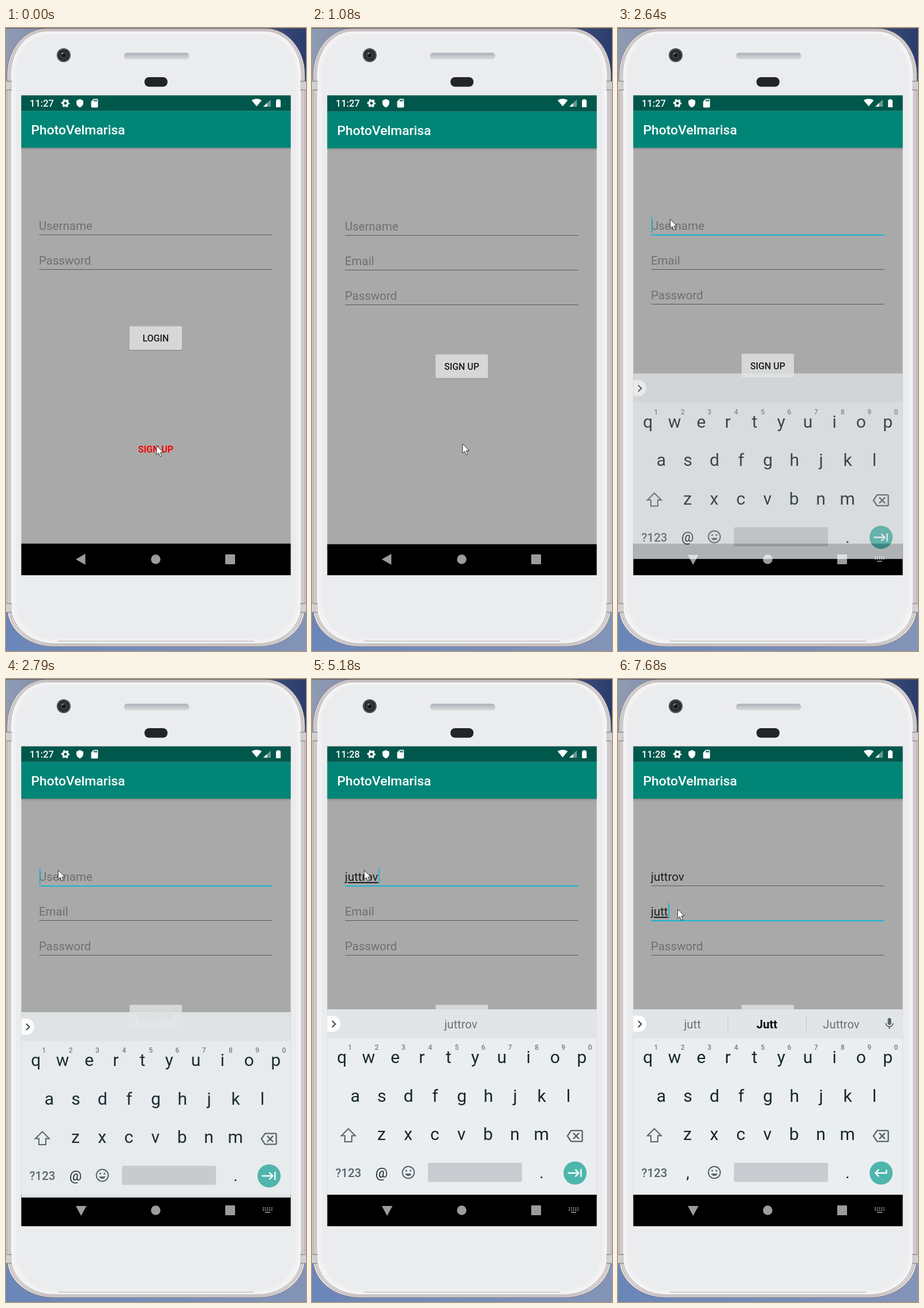
An HTML page that plays this animation: 520x1077 px, repeating every 8000 ms.

```html
<!DOCTYPE html>
<html lang="en">
<head>
<meta charset="utf-8">
<title>Sign up</title>
<style>
  html, body { margin: 0; width: 100%; height: 100%; overflow: hidden; background: #8b94a8; }
  svg { display: block; width: 100vw; height: 100vh; font-family: Roboto, "Noto Sans", sans-serif; }
  .typing { text-decoration: underline; text-decoration-skip-ink: none; }
</style>
</head>
<body>
<svg id="stage" viewBox="0 0 520 1077">
  <defs>
    <linearGradient id="sky"><stop stop-color="#8f9ab3"/><stop offset=".8" stop-color="#4a5a82"/><stop offset="1" stop-color="#2a3c6c"/></linearGradient>
    <linearGradient id="sea"><stop stop-color="#6a86b8"/><stop offset="1" stop-color="#8394b7"/></linearGradient>
    <linearGradient id="slot" x2="0" y2="1"><stop stop-color="#a9adb4"/><stop offset="1" stop-color="#d8dade"/></linearGradient>
    <linearGradient id="shade" x2="0" y2="1"><stop stop-opacity=".17"/><stop offset="1" stop-opacity="0"/></linearGradient>
    <clipPath id="screen"><rect x="26.5" y="116.5" width="467" height="829.5"/></clipPath>
  </defs>
  <g id="phone"></g>
  <g clip-path="url(#screen)" id="view"></g>
  <g id="mouse"><path d="M0 0V16L3.7 12.6 6 19 8.8 17.8 6.4 11.7H11.5Z" fill="#fff" stroke="#222" stroke-width=".9"/></g>
</svg>
<script>
const $ = id => document.getElementById(id);
const NAME = 'juttrov', SIZE = 20.45, LEFT = 57, CYAN = '#16b4d4';
const pen = document.createElement('canvas').getContext('2d');

const rect = (x, y, w, h, fill, extra = '') =>
  `<rect x="${x}" y="${y}" width="${w}" height="${h}" fill="${fill}" ${extra}/>`;
const dot = (x, y, r, fill, extra = '') =>
  `<circle cx="${x}" cy="${y}" r="${r}" fill="${fill}" ${extra}/>`;
const path = (d, fill, extra = '') => `<path d="${d}" fill="${fill}" ${extra}/>`;
const line = (d, stroke, width, extra = '') =>
  path(d, 'none', `stroke="${stroke}" stroke-width="${width}" ${extra}`);
const text = (s, x, y, size, fill, extra = '') =>
  `<text x="${x}" y="${y}" font-size="${size}" fill="${fill}" ${extra}>${s}</text>`;
const mid = (s, x, y, size, fill, weight = 400) =>
  text(s, x, y, size, fill, `text-anchor="middle" font-weight="${weight}"`);
// Icons live on a 24 unit grid, placed by their centre
const icon = (d, x, y, scale, fill) =>
  path(d, fill, `transform="translate(${x} ${y}) scale(${scale}) translate(-12 -12)"`);

const ICONS = {
  shield: 'M12 1L3 5v6c0 5.6 3.8 10.7 9 12 5.2-1.3 9-6.4 9-12V5z',
  card: 'M18 2h-8L4 8v12c0 1.1.9 2 2 2h12c1.1 0 2-.9 2-2V4c0-1.1-.9-2-2-2zm-6 6h-2V4h2zm3 0h-2V4h2zm3 0h-2V4h2z',
  wifi: 'M12 21L24 6.5C23 5.8 18.5 3 12 3S1 5.8 0 6.5z',
  mic: 'M12 14c1.7 0 3-1.3 3-3V5c0-1.7-1.3-3-3-3S9 3.3 9 5v6c0 1.7 1.3 3 3 3zm5.3-3c0 3-2.5 5.1-5.3 5.1S6.7 14 6.7 11H5c0 3.4 2.7 6.2 6 6.7V21h2v-3.3c3.3-.5 6-3.3 6-6.7z',
  enter: 'M19 7v4H5.8l3.6-3.6L8 6l-6 6 6 6 1.4-1.4L5.8 13H21V7z',
  tab: 'M11.6 7.4L15.2 11H1v2h14.2l-3.6 3.6L13 18l6-6-6-6zM20 6v12h2V6z',
  erase: 'M22 3H7c-.7 0-1.2.4-1.6.9L0 12l5.4 8.1c.4.5.9.9 1.6.9h15c1.1 0 2-.9 2-2V5c0-1.1-.9-2-2-2zm0 16H7.1L2.4 12l4.7-7H22zM10.4 17l3.6-3.6 3.6 3.6 1.4-1.4-3.6-3.6L19 8.4 17.6 7 14 10.6 10.4 7 9 8.4l3.6 3.6L9 15.6z'
};

function phone() {
  // Nested outlines; the lower corners are wider and flatter than the upper ones
  const shell = (i, fill, stroke) => {
    const l = 2 + i, r = 518 - i, top = 1 + i * .7, low = 1069 - i * .8, a = 68 - i * .8, b = 80 - i * .8;
    return path(`M${l} ${top + b}A${a} ${b} 0 0 1 ${l + a} ${top}H${r - a}A${a} ${b} 0 0 1 ${r} ${top + b}` +
      `V${low - 66}A${b} 66 0 0 1 ${r - b} ${low}H${l + b}A${b} 66 0 0 1 ${l} ${low - 66}Z`, fill, `stroke="${stroke}"`);
  };
  const band = (x, y) => rect(x, y, 9, 15, '#d2cfd0') +
    line(`M${x} ${y}h9m0 15h-9`, '#777173', 1);
  return rect(0, 0, 520, 540, 'url(#sky)') + rect(0, 540, 520, 537, 'url(#sea)') +
    rect(0, 92, 520, 918, '#d7d6d9') +
    shell(0, '#e3e0e1', '#8e8486') + shell(3, '#dcd8d9', '#aaa0a2') +
    shell(6, '#f4f4f5', '#b3a9aa') + shell(9, '#f1f1f3', '#f8f8f9') + shell(15, '#ebecee', '#eeeef0') +
    [92, 995].map(y => band(1, y) + band(510, y)).join('') +
    line('M90 1060H430', '#aaa3a4', 1) + rect(0, 0, 520, 1, '#5a5a5c') +
    dot(100, 47, 12, '#4a4d50') + dot(100, 47, 9.5, '#282b2d') + dot(100, 47, 6, '#3d4643') +
    dot(100, 47, 3.5, '#111517') + dot(98, 44, 1.5, '#87908f') +
    rect(205, 43, 112, 10, 'url(#slot)', 'rx="4.5" stroke="#c3c6cb"') +
    rect(240, 85, 40, 16.5, '#222427', 'rx="8"');
}

function field(label, y, o = {}) {
  const value = o.value || '';
  pen.font = SIZE + 'px Roboto, "Noto Sans", sans-serif';
  const end = LEFT + .8 + pen.measureText(value).width;
  return (value
    ? text(value, LEFT, y - 8, SIZE, '#1d1d1d', o.focus ? 'class="typing"' : '')
    : text(label, LEFT, y - 8, SIZE, o.press ? '#464646' : '#6f6f6f')) +
    (o.lit ? rect(57.5, y - .1, 404, 2, CYAN) : rect(57.5, y, 404, 1, '#5a5a5a')) +
    (o.focus && o.caret ? rect(end, y - 30, 1.8, 27, CYAN) : '');
}

const button = (label, y) =>
  rect(213.5, y + 1, 92, 41.7, '#000', 'rx="2.5" opacity=".09"') +
  rect(214, y + 1, 91, 41, '#000', 'rx="2" opacity=".12"') +
  rect(214, y, 91, 41.2, '#d6d7d7', 'rx="2"') +
  mid(label, 259.5, y + 26.3, 15.9, '#1c1c1c', 500);

const page = (content, dy) => `<g transform="translate(0 ${dy})">` +
  rect(26, 60, 468, 840, '#a9a9a9') + rect(26, 60, 468, 83.3, '#00574b') +
  rect(26, 143.3, 468, 63.7, '#008577') + rect(26, 207, 468, 4, 'url(#shade)') +
  text('PhotoVelmarisa', 43.5, 184, 22.8, '#fff', 'font-weight="500"') +
  content + rect(26, 891.4, 468, 80, '#000') + '</g>';

const login = s => page(field('Username', 357) + field('Password', 417) + button('LOGIN', 515.4) +
  mid('SIGN UP', 259.5, 733.7, 15.9, '#f60a0a', 700), -s.lift);

const signup = s => page(
  field('Username', 357, { value: NAME.slice(0, s.user), focus: s.focus == 1, caret: s.caret, lit: s.lit & 1, press: s.press == 1 }) +
  field('Email', 417, { value: NAME.slice(0, s.email), focus: s.focus == 2, caret: s.caret, lit: s.lit & 2, press: s.press == 2 }) +
  field('Password', 477) + button('SIGN UP', 563.3), s.shift);

function statusBar(s) {
  return text(s.clock, 41, 136, 16.5, '#fff', 'font-weight="500"') +
    dot(103, 130, 4.1, 'none', 'stroke="#fff" stroke-width="3.2"') +
    dot(103, 130, 6.2, 'none', 'stroke="#fff" stroke-width="2.2" stroke-dasharray="3.25 3.243" stroke-dashoffset="1.6"') +
    icon(ICONS.shield, 128, 130, .66, '#fff') + icon(ICONS.card, 153.5, 130, .74, '#fff') +
    icon(ICONS.wifi, 434.5, 129, .73, '#fff') +
    path('M459 123.500V136H446Z', '#fff', 'opacity=".4"') + path('M452.500 129.800V136H446Z', '#fff') +
    path('M470 123h4v1.500h2V137h-8V124.500h2z', '#fff');
}

function navIcons(s) {
  const back = s.kb ? 'M121 911H139.500L130.200 928Z' : 'M121 918.500L137.500 909V928Z';
  return '<g opacity=".61">' + path(back, '#fff') + dot(259.5, 918.5, 8.2, '#fff') +
    rect(380, 910, 17, 17, '#fff', 'rx="1"') +
    (s.kb ? line('M445 914.500h17M445 918h17', '#fff', 2, 'stroke-dasharray="2 1.700"') +
      line('M449 921.800h9', '#fff', 1.6) : '') + '</g>';
}

function keyboard(s) {
  if (!s.kb) return '';
  const [dy, alpha] = s.kb, ink = '#17272d', soft = '#56646a';
  const row = (keys, x, y) => [...keys].map((k, i) => mid(k, x + 46.2 * i, y, 30, ink)).join('');
  const words = s.words.map((w, i) => {
    const strong = i == 1 && s.email;
    return mid(w, 129 + 129 * i, 604, 20.2, strong ? '#0b0b0b' : '#667278', strong ? 700 : 400);
  }).join('');
  return `<g transform="translate(0 ${dy})" opacity="${alpha}">` +
    rect(26, 571, 468, 320.4, '#eaeef1') + rect(26, 571, 468, 50, '#e1e5e8') +
    path('M26 582h9a14 14 0 0 1 0 28h-9z', '#fff') + line('M35 591l5.500 5.500-5.500 5.500', '#38474d', 2) +
    words + (s.mail ? line('M190.500 583v26M326.500 583v26', '#c3c8cb', 1) + icon(ICONS.mic, 470.5, 596, 1, soft) : '') +
    row('qwertyuiop', 51.8, 664) + row('asdfghjkl', 74.8, 730.7) + row('zxcvbnm', 120.5, 797.3) +
    [...'1234567890'].map((k, i) => mid(k, 66 + 46.2 * i, 641, 12, '#727d82', 500)).join('') +
    line('M63 777.500L75 789.500H69V800H57V789.500H51Z', soft, 2) +
    icon(ICONS.erase, 455.5, 790, 1.18, soft) +
    mid('?123', 63, 861, 20.5, soft, 500) +
    (s.mail ? mid(',', 121, 863, 27, ink) : mid('@', 120.5, 861.5, 24, ink)) +
    dot(167, 853, 10.3, 'none', `stroke="${soft}" stroke-width="2"`) +
    dot(163.3, 850, 1.6, soft) + dot(170.7, 850, 1.6, soft) + path('M161.500 855h11a5.800 5.800 0 0 1-11 0z', soft) +
    rect(201, 836.5, 163, 33, '#c8ccd0', 'rx="3"') + mid('.', 398, 863, 28, ink) +
    dot(456, 854, 20, '#4db6ac') + icon(s.mail ? ICONS.enter : ICONS.tab, 456, 854, 1.15, '#fff') + '</g>';
}

// Each step changes part of the state at its time
const STEPS = [
  [0, { clock: '11:27', mouse: [261, 722], reveal: 950, lift: 0, shift: 0, user: 0, email: 0,
        focus: 0, caret: 0, lit: 0, press: 0, kb: null, words: [], mail: 0 }],
  [810, { reveal: 760, lift: 2, shift: 30 }],
  [930, { reveal: 300, lift: 12, shift: 9, mouse: [261, 719] }],
  [1080, { reveal: 0, shift: 1 }],
  [1200, { shift: 0, mouse: [113, 271] }],
  [1350, { mouse: [98, 238] }],
  [1510, { mouse: [92, 301.5] }],
  [1660, { mouse: [92, 319] }],
  [1810, { mouse: [90.5, 328.5] }],
  [1960, { mouse: [90.5, 330.5] }],
  [2370, { lit: 1, press: 1 }],
  [2490, { press: 0, focus: 1, caret: 1 }],
  [2640, { kb: [26.5, .75] }],
  [2790, { kb: [5, .96] }],
  [2910, { kb: [0, 1], caret: 0 }],
  [3320, { clock: '11:28' }],
  [3470, { caret: 1 }],
  [3770, { user: 1 }],
  [3920, { user: 2 }],
  [4040, { words: ['', 'ju', ''] }],
  [4320, { user: 4, words: ['', 'jutt', ''] }],
  [4720, { user: 5, words: ['', 'juttr', ''] }],
  [4870, { user: 6, words: ['', 'juttro', ''] }],
  [5180, { user: 7, words: ['', NAME, ''] }],
  [5710, { caret: 0 }],
  [5850, { mouse: [93, 348] }],
  [5970, { mouse: [101, 387] }],
  [6090, { mouse: [103.5, 398] }],
  [6240, { caret: 1 }],
  [6360, { lit: 3, press: 2 }],
  [6490, { lit: 2, press: 0, focus: 2 }],
  [6640, { mail: 1, words: ['Thanks', 'I', 'the'] }],
  [7070, { email: 1 }],
  [7190, { words: ['j', 'J', 'jug'] }],
  [7310, { email: 2 }],
  [7430, { words: ['ju', 'Ju', 'jug'] }],
  [7680, { email: 4, words: ['jutt', 'Jutt', 'Juttrov'] }]
];

function draw(count) {
  const s = Object.assign({}, ...STEPS.slice(0, count).map(step => step[1]));
  $('view').innerHTML = `<clipPath id="cut">${rect(26, s.reveal, 468, 960, '#000')}</clipPath>` +
    (s.reveal ? login(s) : '') + `<g clip-path="url(#cut)">${signup(s)}</g>` +
    keyboard(s) + statusBar(s) + navIcons(s);
  $('mouse').setAttribute('transform', `translate(${s.mouse})`);
}

let shown = 0;
function tick() {
  const t = performance.now() % 8000;
  const count = STEPS.filter(step => step[0] <= t).length;
  if (count != shown) draw(shown = count);
  requestAnimationFrame(tick);
}
$('phone').innerHTML = phone();
tick();
</script>
</body>
</html>
```
